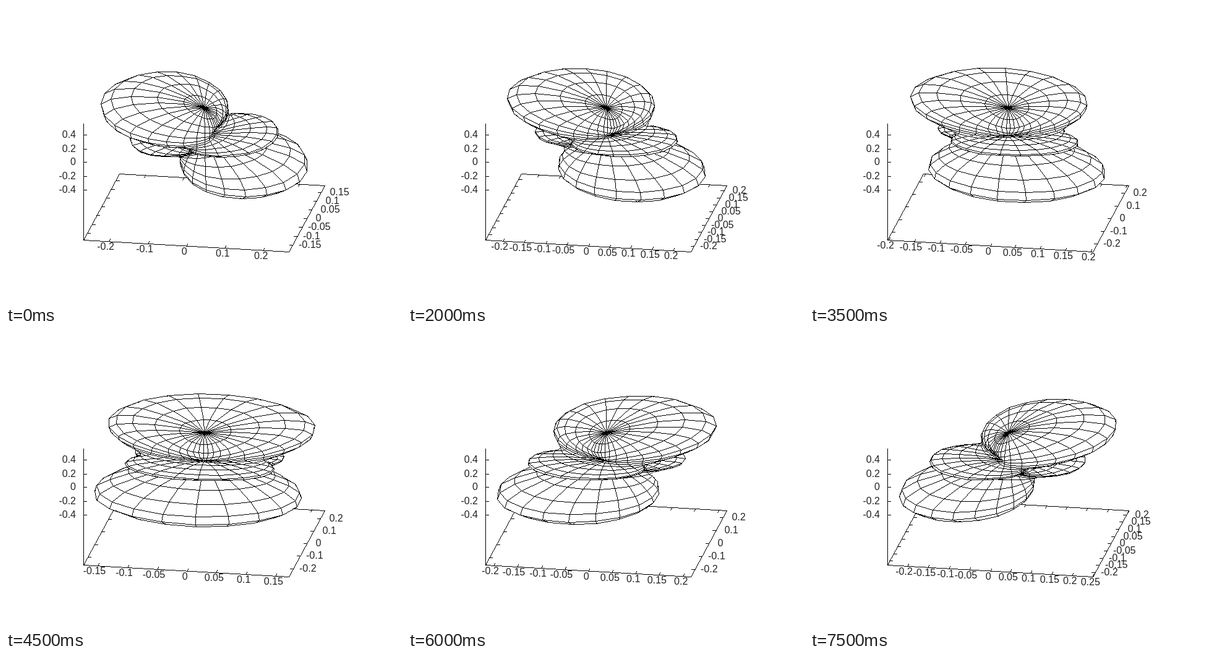
Recreate the animation shown at these times as an HTML page with a canvas. Size 640 by 480 pixels, loop 8 s.

```html
<!DOCTYPE html>
<html lang="en">
<head>
<meta charset="utf-8">
<title>Rotating orbital density</title>
<style>
html, body { margin: 0; width: 100%; height: 100%; overflow: hidden; background: #fff; }
canvas { display: block; width: 640px; height: 480px; }
</style>
</head>
<body>
<canvas id="plot" width="640" height="480"></canvas>
<script>
const W = 640, H = 480, N = 29, STEPS = 16, STEP_MS = 500;
const SCALE_X = 169, SCALE_Y = 109;
const ctx = document.getElementById('plot').getContext('2d');
const rad = Math.PI / 180;
const sinZ = Math.sin(10 * rad), cosZ = Math.cos(10 * rad);
const sinX = Math.sin(60 * rad), cosX = Math.cos(60 * rad);
const depth = new Float32Array(W * H);
const image = ctx.createImageData(W, H);
const ink = new Uint32Array(image.data.buffer);

// Squared modulus of Y20 + Y21 with relative phase a
function density(th, ph, a) {
  const c = Math.cos(th), s = Math.sin(th);
  const y20 = Math.sqrt(5 / (16 * Math.PI)) * (3 * c * c - 1);
  const y21 = Math.sqrt(15 / (8 * Math.PI)) * s * c;
  return y20 * y20 + y21 * y21 + 2 * y20 * y21 * Math.cos(ph - a);
}

function surface(a) {
  const pts = [];
  for (let i = 0; i <= N; i++) {
    for (let j = 0; j <= N; j++) {
      const th = Math.PI * i / N, ph = 2 * Math.PI * j / N;
      const r = density(th, ph, a), s = r * Math.sin(th);
      pts.push([s * Math.cos(ph), s * Math.sin(ph), r * Math.cos(th)]);
    }
  }
  return pts;
}

// Box coordinates in -1..1 to whole pixels (cut towards the centre) and nearness
function project(x, y, z) {
  const u = x * cosZ + y * sinZ, v = y * cosZ - x * sinZ;
  return [
    W / 2 + Math.trunc(SCALE_X * u),
    H / 2 - Math.trunc(SCALE_Y * (v * cosX + z * sinX)),
    z * cosX - v * sinX
  ];
}

function fillTriangle(a, b, c) {
  const area = (b[0] - a[0]) * (c[1] - a[1]) - (b[1] - a[1]) * (c[0] - a[0]);
  if (!area) return;
  const x0 = Math.min(a[0], b[0], c[0]), x1 = Math.max(a[0], b[0], c[0]);
  const y0 = Math.min(a[1], b[1], c[1]), y1 = Math.max(a[1], b[1], c[1]);
  const e = -1e-6;
  for (let y = y0; y <= y1; y++) {
    for (let x = x0; x <= x1; x++) {
      const u = ((b[0] - x) * (c[1] - y) - (b[1] - y) * (c[0] - x)) / area;
      const v = ((c[0] - x) * (a[1] - y) - (c[1] - y) * (a[0] - x)) / area;
      const w = 1 - u - v;
      if (u < e || v < e || w < e) continue;
      const d = u * a[2] + v * b[2] + w * c[2], k = y * W + x;
      if (d > depth[k]) depth[k] = d;
    }
  }
}

function visible(k, d) {
  return d + 0.004 >= Math.min(depth[k], depth[k - 1], depth[k + 1], depth[k - W], depth[k + W]);
}

function line(a, b) {
  const dx = b[0] - a[0], dy = b[1] - a[1];
  const n = Math.max(Math.abs(dx), Math.abs(dy), 1);
  for (let i = 0; i <= n; i++) {
    const t = i / n;
    const k = Math.round(a[1] + dy * t) * W + Math.round(a[0] + dx * t);
    if (visible(k, a[2] + (b[2] - a[2]) * t)) ink[k] = 0xff000000;
  }
}

function tick(p, dx, dy) {
  line(p, [p[0] + dx, p[1] + dy, p[2]]);
}

function range(pts, axis) {
  const vals = pts.map(p => p[axis]);
  return [Math.min(...vals), Math.max(...vals)];
}

const norm = (v, [lo, hi]) => 2 * (v - lo) / (hi - lo) - 1;

function tickValues([lo, hi], step) {
  const out = [], fuzz = step * 0.01;
  for (let i = Math.ceil((lo - fuzz) / step); i * step <= hi + fuzz; i++) out.push(i * step);
  return out;
}

const autoStep = ([lo, hi]) => hi - lo < 0.5 ? 0.05 : 0.1;

function label(v) {
  const s = String(+v.toFixed(2) || 0);
  return s[0] === '-' ? s : '\u00a0' + s;
}

function draw(step) {
  const pts = surface((171 - 9 * step) * rad);
  const rx = range(pts, 0), ry = range(pts, 1), rz = range(pts, 2);
  const box = [rz[0] - (rz[1] - rz[0]) / 2, rz[1]];
  const mesh = pts.map(p => project(norm(p[0], rx), norm(p[1], ry), norm(p[2], box)));
  const at = (i, j) => mesh[i * (N + 1) + j];
  const texts = [];

  depth.fill(-9);
  ink.fill(0xffffffff);
  for (let i = 0; i < N; i++) {
    for (let j = 0; j < N; j++) {
      fillTriangle(at(i, j), at(i + 1, j), at(i, j + 1));
      fillTriangle(at(i + 1, j + 1), at(i + 1, j), at(i, j + 1));
    }
  }
  for (let i = 0; i <= N; i++) {
    for (let j = 0; j < N; j++) {
      line(at(i, j), at(i, j + 1));
      line(at(j, i), at(j + 1, i));
    }
  }

  const base = [[-1, -1], [1, -1], [1, 1], [-1, 1]].map(([x, y]) => project(x, y, -1));
  base.forEach((p, i) => line(p, base[(i + 1) % 4]));
  line(base[0], project(-1, -1, 1));

  for (const v of tickValues(rx, autoStep(rx))) {
    const x = norm(v, rx), p = project(x, -1, -1);
    tick(p, 2, -4);
    tick(project(x, 1, -1), -2, 4);
    texts.push([label(v), p[0] - 5, p[1] + 14, 'center']);
  }
  for (const v of tickValues(ry, autoStep(ry))) {
    const y = norm(v, ry), p = project(1, y, -1);
    tick(p, -5, 0);
    tick(project(-1, y, -1), 5, 0);
    texts.push([label(v), p[0] + 10, p[1] + 5, 'left']);
  }
  for (const v of tickValues([-0.4, 0.4], 0.2)) {
    const p = project(-1, -1, norm(v, box));
    tick(p, 5, 0);
    texts.push([label(v), 113, p[1] + 5, 'right']);
  }

  ctx.putImageData(image, 0, 0);
  ctx.fillStyle = '#222';
  ctx.font = '16px "Liberation Sans", Arial, sans-serif';
  for (const [s, x, y, align] of texts) {
    ctx.textAlign = align;
    ctx.fillText(s, x, y);
  }
}

let shown = -1;
function frame(now) {
  const step = Math.floor(now / STEP_MS) % STEPS;
  if (step !== shown) draw(shown = step);
  requestAnimationFrame(frame);
}
frame(performance.now());
</script>
</body>
</html>
```
